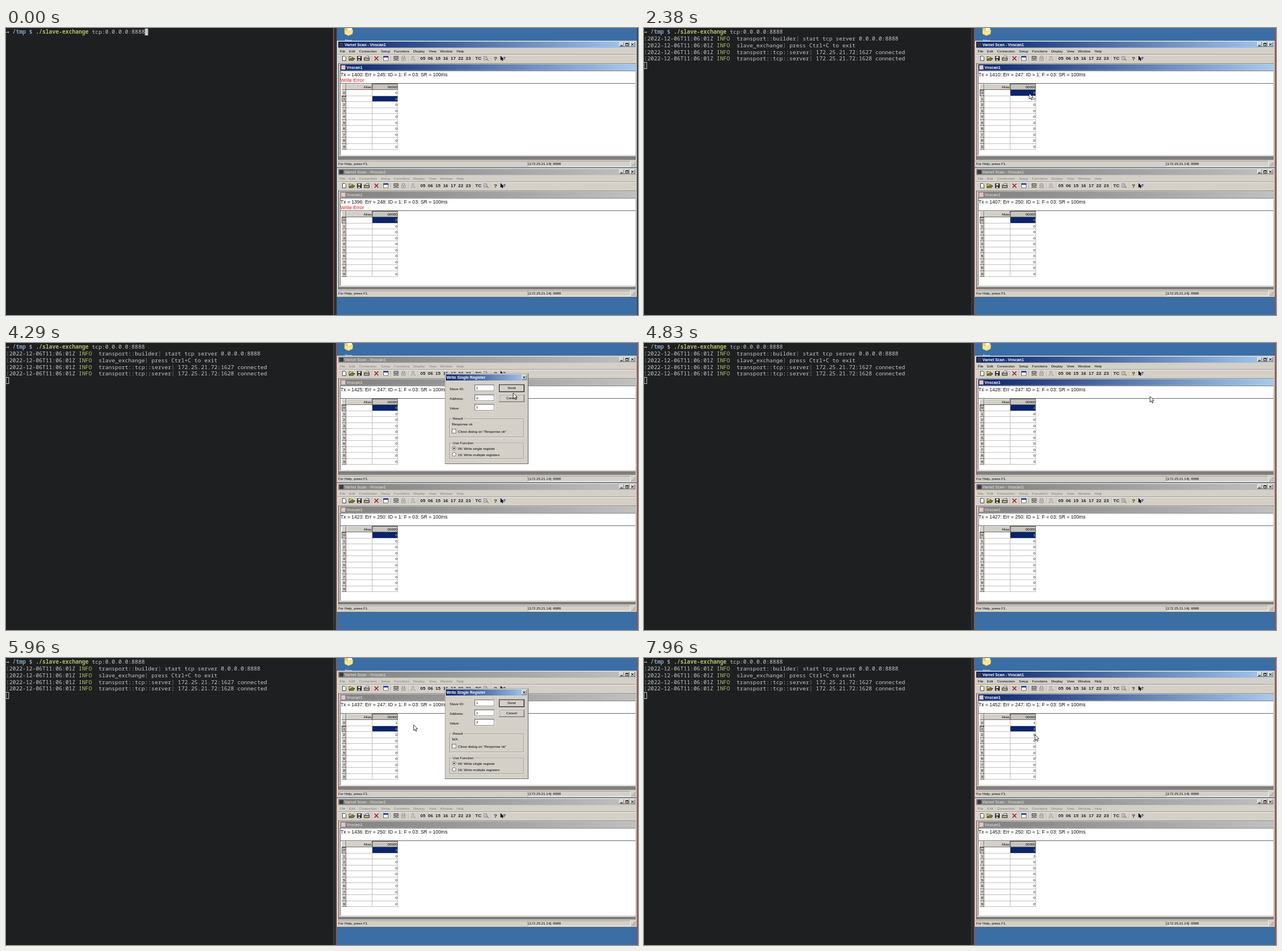
An HTML page with a canvas that plays this animation: 1109 by 505 pixels, repeating every 8 s.

```html
<!DOCTYPE html>
<html lang="en">
<head>
<meta charset="utf-8">
<title>Slave exchange</title>
<style>
html, body { margin: 0; width: 100%; height: 100%; overflow: hidden; background: #1d1f21; }
canvas { display: block; width: 1109px; height: 505px; }
</style>
</head>
<body>
<canvas id="stage" width="1109" height="505"></canvas>
<script>
const ctx = document.getElementById('stage').getContext('2d');
const LOOP = 8000;
const SANS = '"Liberation Sans", Arial, sans-serif';
const MONO = '"Noto Sans Mono", "DejaVu Sans Mono", monospace';
const FACE = '#d4d0c8', DARK = '#808080', EDGE = '#404040', NAVY = '#0a246a';
const APP = 'Varnel Scan', DOC = 'Vnscan1';

// Bursts of change: start, end, number of updates
const BURSTS = [
  [380, 460, 2], [630, 630, 1], [960, 1040, 2], [1460, 2210, 12], [2290, 3040, 9],
  [3210, 4000, 13], [4080, 4540, 8], [4710, 5500, 13], [5540, 6330, 12],
  [6380, 6790, 6], [6960, 7080, 3], [7250, 7960, 11]
];
const TX_TOP = [[1460, 1404], [2940, 1416], [4270, 1425], [5540, 1435], [6790, 1444], [7960, 1452]];
const TX_LOW = [[1460, 1401], [2940, 1413], [4270, 1423], [5540, 1434], [6790, 1444], [7960, 1453]];
const MOUSE = [
  [1540, 581, 190], [2140, 676, 115], [3280, 676, 115], [3990, 884, 80], [4150, 884, 80],
  [4270, 890, 88], [4530, 888, 94], [4770, 888, 94], [5490, 677, 126], [5740, 677, 126],
  [6320, 884, 80], [6520, 884, 80], [6780, 888, 94], [7080, 889, 94], [7320, 889, 94], [7950, 686, 135]
];

function snap(t) {
  let at = 0;
  for (const [a, b, n] of BURSTS) {
    if (t < a) break;
    const step = (b - a) / Math.max(1, n - 1);
    at = t >= b ? b : a + Math.floor((t - a) / step) * step;
  }
  return at;
}

function along(keys, t, ease = k => k) {
  if (t <= keys[0][0]) return keys[0].slice(1);
  for (let i = 1; i < keys.length; i++) {
    const p = keys[i - 1], q = keys[i];
    if (t < q[0]) {
      const k = ease((t - p[0]) / (q[0] - p[0]));
      return p.slice(1).map((v, j) => v + (q[j + 1] - v) * k);
    }
  }
  return keys[keys.length - 1].slice(1);
}
const smooth = k => k * k * (3 - 2 * k);

function rect(x, y, w, h, color) {
  ctx.fillStyle = color;
  ctx.fillRect(x, y, w, h);
}

function text(s, x, y, { size = 6.2, color = '#000', bold = false, align = 'left', font = SANS } = {}) {
  ctx.font = `${bold ? 'bold ' : ''}${size}px ${font}`;
  ctx.textAlign = align;
  ctx.fillStyle = color;
  ctx.fillText(s, x, y);
}

function path(pts, color, width = 1, fill) {
  ctx.beginPath();
  pts.forEach(([x, y], i) => i ? ctx.lineTo(x, y) : ctx.moveTo(x, y));
  if (fill) { ctx.closePath(); ctx.fillStyle = fill; ctx.fill(); }
  ctx.strokeStyle = color;
  ctx.lineWidth = width;
  ctx.stroke();
}

function frame(x, y, w, h, color, width = 0.7) {
  ctx.strokeStyle = color;
  ctx.lineWidth = width;
  ctx.strokeRect(x + width / 2, y + width / 2, w - width, h - width);
}

function bevel(x, y, w, h, face = FACE, sunk = false) {
  rect(x, y, w, h, face);
  const [lit, shade] = sunk ? [DARK, '#fff'] : ['#fff', EDGE];
  rect(x, y, w, 0.7, lit);
  rect(x, y, 0.7, h, lit);
  rect(x, y + h - 0.7, w, 0.7, shade);
  rect(x + w - 0.7, y, 0.7, h, shade);
}

function titleBar(x, y, w, h, active) {
  const g = ctx.createLinearGradient(x, 0, x + w, 0);
  g.addColorStop(0, active ? NAVY : DARK);
  g.addColorStop(1, active ? '#a6caf0' : '#c0c0c0');
  rect(x, y, w, h, g);
}

const titleInk = active => ({ size: 6.8, bold: true, color: active ? '#fff' : FACE });

function cross(x, y, r, color, width) {
  path([[x - r, y - r], [x + r, y + r]], color, width);
  path([[x - r, y + r], [x + r, y - r]], color, width);
}

function terminal(t, focus) {
  const CW = 5.8, LH = 11.7, ink = '#c5c8c6', green = '#b5bd68', dim = '#6c6f70';
  rect(0, 0, 580, 505, '#1d1f21');
  const put = (s, col, row, color = ink, bold = false, font = MONO) =>
    text(s, col * CW, 10.4 + row * LH, { size: 9.66, color, bold, font });
  put('→', 0, 0, green, true, '"DejaVu Sans Mono", monospace');
  put('/tmp', 2, 0, '#81a2be', true);
  put('$', 7, 0);
  put('./slave-exchange', 9, 0, green, true);
  put('tcp:0.0.0.0:8888', 26, 0);

  const logs = [
    [630, 'transport::builder', 'start tcp server 0.0.0.0:8888'],
    [630, 'slave_exchange', 'press Ctrl+C to exit'],
    [960, 'transport::tcp::server', '172.25.21.72:1627 connected'],
    [1040, 'transport::tcp::server', '172.25.21.72:1628 connected']
  ].filter(l => t >= l[0]);
  logs.forEach(([, from, msg], i) => {
    const row = i + 1, end = 28 + from.length;
    put('[', 0, row, dim);
    put('2022-12-06T11:06:01Z', 1, row);
    put('INFO', 22, row, green);
    put(from, 28, row);
    put(']', end, row, dim);
    put(msg, end + 2, row);
  });

  const cx = logs.length ? -0.5 : 42 * CW;
  const cy = Math.round(1.4 + (logs.length ? logs.length + 1 : 0) * LH);
  if (focus) rect(cx, cy, CW, 12, ink);
  else frame(cx, cy, CW, 12, ink, 1);
}

function borders(focus) {
  const lit = '#a5503f', idle = '#36393b';
  rect(574, 0, 6, 505, '#2b2d2f');
  rect(574, 0, 1.5, 505, focus ? lit : idle);
  rect(579, 0, 1.5, 505, focus ? idle : lit);
  rect(1107.5, 0, 1.5, 505, focus ? idle : lit);
}

function desktop() {
  rect(580, 0, 529, 505, '#3a6ea5');
  path([[594, 0], [600, 0], [607, 2], [608, 10], [601, 13.5], [594, 10]], '#b8923a', 0.6, '#f3cf66');
  path([[599, 0], [607, 0], [608, 7], [600, 9]], '#cdbf86', 0.5, '#fffbe6');
  path([[594, 3], [601, 6], [609, 3], [608, 10.5], [601, 13.5], [594.5, 10.5]], '#c9a548', 0.5, '#fbe698');
  text('New', 601, 23.5, { color: '#fff', align: 'center' });
}

function toolbar(y) {
  const sep = x => { rect(x, y - 5, 0.7, 10, DARK); rect(x + 0.7, y - 5, 0.7, 10, '#fff'); };
  [642, 658, 675.5, 706, 723, 820, 851].forEach(sep);
  path([[590.5, y - 4], [594.5, y - 4], [596.5, y - 2], [596.5, y + 4], [590.5, y + 4]], '#222', 0.8, '#fff');
  path([[602, y + 3.5], [602, y - 3], [605, y - 3], [606, y - 2], [609, y - 2], [609, y]], '#222', 0.8, '#f6e96b');
  path([[602, y + 3.5], [604, y], [612, y], [609.5, y + 3.5]], '#222', 0.8, '#8a8420');
  rect(616, y - 4, 8, 8, '#111');
  rect(617.8, y - 3.5, 4.4, 3.4, FACE);
  rect(618, y + 1.5, 3.5, 2, '#ddd');
  rect(616.8, y - 3, 0.8, 6, '#77761c');
  path([[630, y - 1], [632, y - 4], [637, y - 4], [636, y - 1]], '#333', 0.7, '#fff');
  path([[628.5, y - 1], [637.5, y - 1], [637.5, y + 3.5], [628.5, y + 3.5]], '#222', 0.8, '#9a968c');
  rect(630, y + 1, 5, 1, '#d8d04c');
  cross(650, y, 3.4, '#a80f18', 1.4);
  rect(662, y - 4, 9, 8, '#fff');
  frame(662, y - 4, 9, 8, '#333');
  rect(662, y - 4, 9, 2.3, '#1c2fa0');
  frame(680.5, y - 4, 8, 5, '#333', 1);
  rect(682, y - 2.6, 5, 2, '#999');
  rect(680, y + 2.5, 3, 1, '#333');
  rect(686, y + 2.5, 3, 1, '#333');
  rect(684, y + 1, 1, 3, '#333');
  frame(694, y - 1.5, 7, 5.5, '#929088', 0.9);
  path([[695.5, y - 1], [695.5, y - 4], [699.5, y - 4], [699.5, y - 1]], '#929088', 0.9);
  rect(696, y + 0.5, 3, 1.2, '#929088');
  path([[710, y + 3], [712.5, y + 3], [712.5, y - 3.5], [715.5, y - 3.5], [715.5, y + 3], [719, y + 3]], '#98958d', 0.9);
  ['05', '06', '15', '16', '17', '22', '23'].forEach((s, i) =>
    text(s, 727 + i * 13.3, y + 2.9, { size: 8, bold: true, color: '#222' }));
  text('TC', 823.5, y + 2.9, { size: 8, bold: true, color: '#222' });
  frame(838, y - 4, 6, 7, '#8a8880', 0.8);
  ctx.beginPath();
  ctx.arc(842.5, y, 2, 0, 7);
  ctx.stroke();
  path([[844, y + 1.5], [847, y + 4]], '#555', 1);
  text('?', 856, y + 3.4, { size: 9.5, bold: true });
  text('?', 855.6, y + 3, { size: 9.5, bold: true, color: '#8c8410' });
  path([[868, y - 4], [868, y + 3], [869.7, y + 1.5], [871, y + 4], [872, y + 3.6], [871, y + 1], [873, y + 1]], '#000', 0.6, '#000');
  text('?', 872, y + 2.6, { size: 8, bold: true, color: '#1c2070' });
}

function grid(y, values, sel) {
  const RH = 10.53, top = y + 11;
  bevel(589, y, 8, 11);
  bevel(597, y, 45.5, 11);
  bevel(642.5, y, 45, 11, '#c8c4bc', true);
  frame(642.5, y, 45, 11, EDGE, 0.8);
  text('Alias', 641, y + 8.4, { align: 'right' });
  text('00000', 686.8, y + 8.4, { align: 'right' });
  for (let i = 0; i < 10; i++) {
    const ry = Math.round(top + i * RH), h = Math.round(top + (i + 1) * RH) - ry, on = i === sel;
    bevel(589, ry, 8, h, on ? '#c8c4bc' : FACE, on);
    if (on) frame(589, ry, 8, h, EDGE, 0.8);
    text(i, 593.2, ry + 7.4, { align: 'center' });
    rect(597, ry + h - 1, 91, 1, '#c0c0c0');
    rect(642, ry, 1, h, '#c0c0c0');
    rect(687, ry, 1, h, '#c0c0c0');
    if (on) rect(643, ry, 44, h - 1, NAVY);
    text(values[i] || 0, 686.6, ry + 7.4, { align: 'right', color: on ? '#cfd6e8' : '#000' });
  }
}

function windowAt(y, h, w) {
  const { active, tx, err, failed, values, sel, strip } = w;
  const bottom = y + h, mdiTop = y + 39, mdiEnd = bottom - 13, childEnd = mdiEnd - strip;
  rect(580.5, y - 0.6, 527, h + 1.2, FACE);
  rect(581.2, y, 525, 0.6, '#fff');
  rect(581.2, y, 0.6, h, '#fff');
  rect(580.5, bottom, 527, 0.6, EDGE);
  rect(1106.8, y - 0.6, 0.7, h + 1.2, EDGE);
  titleBar(583, y + 1, 522, 10.6, active);
  rect(585, y + 2.8, 7, 7, '#3a3a3a');
  text(`${APP} - ${DOC}`, 594, y + 8.7, titleInk(active));
  [1076, 1085, 1095].forEach(x => bevel(x, y + 2, 8.5, 8));
  rect(1078, y + 7.4, 4, 1.1, '#000');
  frame(1087, y + 3.6, 5, 4.8, '#000', 0.8);
  rect(1087, y + 3.6, 5, 1.2, '#000');
  cross(1099.2, y + 5.9, 2, '#000', 1);

  const menu = [['File', 585.5], ['Edit', 602], ['Connection', 619.5], ['Setup', 658], ['Functions', 681],
    ['Display', 714.5], ['View', 742], ['Window', 761.5], ['Help', 790.5]];
  menu.forEach(([s, x]) => text(s, x, y + 19.8, { color: active ? '#000' : DARK }));
  rect(582, y + 23.2, 523, 0.7, DARK);
  rect(582, y + 24, 523, 0.7, '#fff');
  toolbar(y + 30.5);

  // Document window
  rect(583, mdiTop, 522, mdiEnd - mdiTop, DARK);
  rect(583, mdiTop, 522, 0.6, EDGE);
  rect(583.4, mdiTop, 0.7, mdiEnd - mdiTop, EDGE);
  rect(584.1, mdiTop + 0.6, 520.4, childEnd - mdiTop - 0.6, FACE);
  rect(584.1, childEnd - 0.7, 520.4, 0.7, EDGE);
  titleBar(586.6, y + 40.8, 518, 10.8, active);
  rect(588.2, y + 42.6, 7.4, 7.4, '#e6c4c4');
  text(DOC, 597.5, y + 48.9, titleInk(active));
  rect(586, y + 52, 518.5, childEnd - 3.4 - y - 52, '#fff');
  rect(586, y + 52, 518.5, 0.7, EDGE);
  rect(586, y + 52, 0.8, childEnd - 3.4 - y - 52, EDGE);
  text(`Tx = ${tx}: Err = ${err}: ID = 1: F = 03: SR = 100ms`, 587, y + 61.6, { size: 8.57, color: '#111' });
  if (failed) text('Write Error', 587, y + 71.6, { size: 8.57, color: '#f01010' });
  rect(587, y + 74, 517.5, 0.8, EDGE);
  grid(y + 75, values, sel);

  // Status bar
  rect(582, bottom - 13, 524, 12, FACE);
  rect(582, bottom - 11.2, 332, 0.7, DARK);
  bevel(915, bottom - 11.2, 181, 10, FACE, true);
  text('For Help, press F1.', 583, bottom - 3.8);
  text('[172.25.21.14]: 8888', 917, bottom - 3.8);
  for (let i = 0; i < 3; i++) path([[1097.5 + i * 2.7, bottom - 1.6], [1105, bottom - 9 + i * 2.7]], DARK, 0.8);
}

function field(label, value, y, selected) {
  text(label, 778.5, y + 9.8);
  bevel(822, y, 35.5, 12, '#fff', true);
  frame(822.6, y + 0.6, 34.4, 10.8, EDGE, 0.6);
  if (selected) rect(824, y + 1.8, 5, 8.6, NAVY);
  text(value, 825, y + 8.2, { color: selected ? '#fff' : '#000' });
}

function button(label, y, main, down) {
  bevel(865, y, 44.5, 13.4, FACE, down);
  frame(865.7, y + 0.7, 43, 12, DARK, 0.6);
  if (main) frame(865, y, 44.5, 13.4, '#111', 0.9);
  const d = down ? 0.7 : 0;
  text(label, 887.3 + d, y + 8.6 + d, { align: 'center' });
}

function group(label, y, h, w) {
  frame(778.8, y + 0.7, 130.5, h, '#fff');
  frame(778, y, 130.5, h, DARK);
  rect(782.5, y - 1, w, 3, FACE);
  text(label, 784, y + 2.3);
}

function radio(y, on) {
  ctx.beginPath();
  ctx.arc(786.3, y, 3.2, 0, 7);
  ctx.fillStyle = '#fff';
  ctx.fill();
  ctx.strokeStyle = '#66645f';
  ctx.lineWidth = 0.9;
  ctx.stroke();
  if (on) {
    ctx.beginPath();
    ctx.arc(786.3, y, 1.3, 0, 7);
    ctx.fillStyle = '#000';
    ctx.fill();
  }
}

function dialog({ address, value, typed, down, done }) {
  bevel(770, 53.6, 146.5, 159.4);
  frame(770, 53.6, 146.5, 159.4, '#77746e', 0.6);
  titleBar(772, 55.4, 142.5, 10.6, true);
  text('Write Single Register', 773, 63.2, titleInk(true));
  bevel(905, 56.6, 8.6, 8.2);
  cross(909.2, 60.6, 2, '#000', 1);
  field('Slave ID:', 1, 73);
  field('Address:', address, 90.4);
  field('Value:', typed ? value : 0, 107.2, !typed);
  button('Send', 72.8, true, down);
  button('Cancel', 90.6);
  group('Result', 133, 33, 20);
  text(done ? 'Response ok' : 'N/A', 782.5, 145);
  bevel(782.4, 151.4, 7.6, 7.6, '#fff', true);
  frame(782.4, 151.4, 7.6, 7.6, '#66645f', 0.8);
  text('Close dialog on "Response ok"', 793, 157.8);
  group('Use Function', 175.6, 28, 39);
  radio(185.2, true);
  radio(196, false);
  text('06: Write single register', 793, 187.8);
  text('16: Write multiple registers', 793, 198.6);
}

function pointer(x, y) {
  const shape = [[0, 0], [0, 10], [2.3, 7.9], [4, 11.6], [5.6, 10.9], [4, 7.3], [7, 7.1]];
  path(shape.map(([a, b]) => [x + a, y + b]), '#000', 0.8, '#fff');
}

function draw(time) {
  const t = snap(time);
  const between = (a, b) => t >= a && t < b;
  const early = t < 1460, focus = t < 1540;
  const first = between(2470, 4710), second = between(5650, 7250);
  ctx.clearRect(0, 0, 1109, 505);
  terminal(t, focus);
  desktop();
  windowAt(23, 222, {
    active: !first && !second,
    tx: early ? (t >= 380 ? 1401 : 1400) : Math.floor(along(TX_TOP, t)[0]),
    err: early ? (t >= 380 ? 246 : 245) : 247,
    failed: early,
    values: [t >= 4400 ? 1 : 0, t >= 6600 ? 2 : 0],
    sel: between(2210, 5490) ? 0 : 1,
    strip: 5
  });
  windowAt(247, 226, {
    active: false,
    tx: early ? (t >= 460 ? 1397 : 1396) : Math.floor(along(TX_LOW, t)[0]),
    err: early ? (t >= 460 ? 249 : 248) : 250,
    failed: early,
    values: [t >= 4460 ? 1 : 0, t >= 6690 ? 2 : 0],
    sel: 0,
    strip: 3.4
  });
  if (first) dialog({ address: 0, value: 1, typed: t >= 3210, down: between(4080, 4200), done: t >= 4200 });
  if (second) dialog({ address: 1, value: 2, typed: t >= 5880, down: between(6380, 6500), done: t >= 6500 });
  if (!focus) pointer(...along(MOUSE, t, smooth));
  borders(focus);
}

function tick() {
  draw(performance.now() % LOOP);
  requestAnimationFrame(tick);
}
tick();
</script>
</body>
</html>
```
